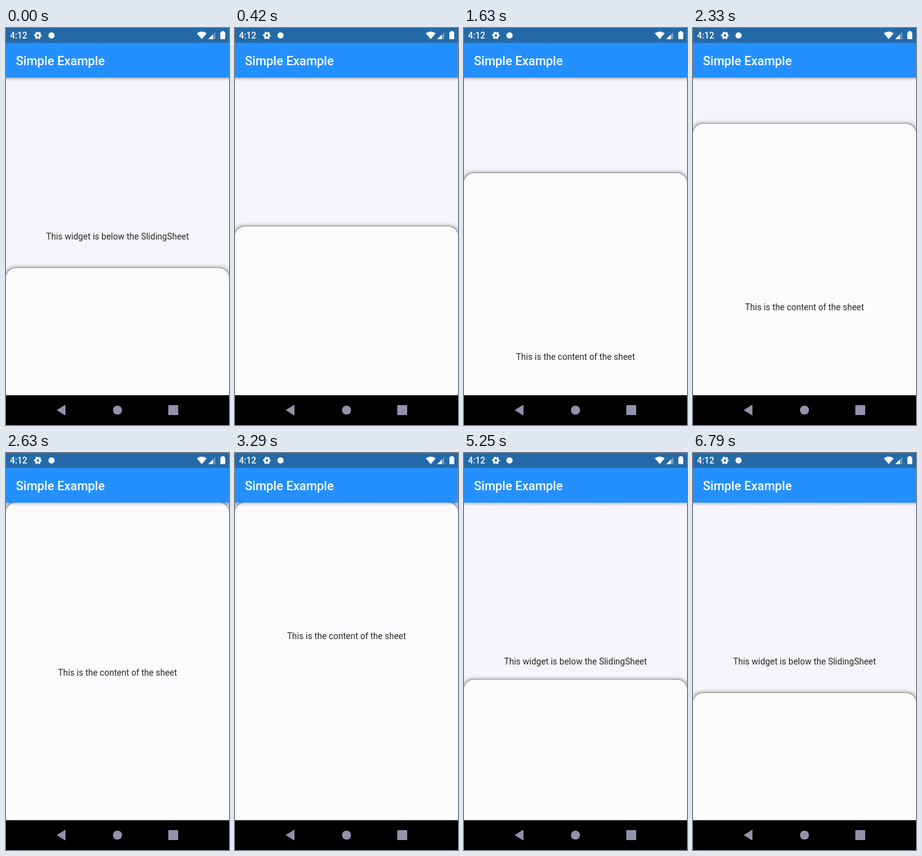
Write an HTML page that moves like this. It is 360 px wide and 640 px high and loops after 7000 ms.

```html
<!DOCTYPE html>
<html lang="en">
<head>
<meta charset="utf-8">
<title>Sliding sheet</title>
<style>
  html, body { margin: 0; width: 100%; height: 100%; overflow: hidden; background: #000; }
  svg { display: block; width: 100%; height: 100%; font-family: Roboto, sans-serif; font-size: 14px; }
</style>
</head>
<body>
<svg viewBox="0 0 360 640">
  <defs>
    <linearGradient id="fade" x1="0" y1="0" x2="0" y2="1">
      <stop offset="0" stop-opacity=".25"/>
      <stop offset=".4" stop-opacity=".1"/>
      <stop offset="1" stop-opacity="0"/>
    </linearGradient>
    <filter id="blur" x="-10%" y="-10%" width="120%" height="120%">
      <feGaussianBlur stdDeviation="3.5"/>
    </filter>
    <clipPath id="body"><rect y="80" width="360" height="512"/></clipPath>
  </defs>

  <g clip-path="url(#body)">
    <rect y="80" width="360" height="512" fill="#f6f5fb"/>
    <text x="180" y="341" text-anchor="middle" fill="#282826">This widget is below the SlidingSheet</text>
    <g id="sheet">
      <rect x="-2" y="-1" width="364" height="620" rx="16" opacity=".36" filter="url(#blur)"/>
      <rect x="-.5" y="-1.5" width="361" height="620" rx="16" fill="#888880" opacity=".55"/>
      <rect width="360" height="620" rx="16" fill="#fcfcfe"/>
    </g>
    <text id="content" x="180" text-anchor="middle" fill="#282826">This is the content of the sheet</text>
    <rect y="80" width="360" height="6" fill="url(#fade)"/>
  </g>

  <rect y="24" width="360" height="56" fill="#2490ff"/>
  <rect width="360" height="24" fill="#256aa8"/>
  <text x="16" y="60" fill="#fff" font-size="20" font-weight="500">Simple Example</text>

  <g fill="#fff">
    <text x="6.500" y="17" font-weight="500">4:12</text>
    <g transform="translate(51.5 12)" fill="none" stroke="#fff">
      <circle r="3.5" stroke-width="3"/>
      <circle r="5.2" stroke-width="2" stroke-dasharray="2.8 2.645" stroke-dashoffset="1.4"/>
    </g>
    <circle cx="73.500" cy="12" r="5"/>
    <path d="M308 8.500Q316 3 324 8.500L316 18Z"/>
    <path d="M326.500 18L338 6.500V18Z" opacity=".3"/>
    <path d="M326.500 18L334 10.500V18Z"/>
    <path d="M348 6.500V5H352V6.500H353Q354 6.500 354 7.500V17Q354 18 353 18H347Q346 18 346 17V7.500Q346 6.500 347 6.500Z"/>
  </g>

  <rect y="592" width="360" height="48"/>
  <g fill="#9292ac">
    <path d="M82.500 616L95.500 608V624Z" stroke="#9292ac" stroke-linejoin="round"/>
    <circle cx="180" cy="616" r="7.300"/>
    <rect x="262" y="608" width="16" height="16" rx="1"/>
  </g>
</svg>
<script>
  const LOOP = 7000, STEP = 1000 / 24;
  const TOP = 80, REST = 387, HALF = 234, SCROLLED = -1;
  const EASE = [.25, .1, .25, 1];

  // Each move: start, end, from, to, cubic-bezier curve
  const moves = [
    [0, 1580, REST, HALF, EASE],
    [2135, 3085, HALF, SCROLLED, [.15, .2, .5, 1]],
    [3630, 4340, SCROLLED, HALF, [.3, .1, .575, 1]],
    [5042, 5410, HALF, REST, EASE]
  ];

  const cubic = (s, a, b) => 3 * (1 - s) * (1 - s) * s * a + 3 * (1 - s) * s * s * b + s * s * s;

  function bezier(x, [x1, y1, x2, y2]) {
    let lo = 0, hi = 1;
    for (let i = 0; i < 24; i++) {
      const mid = (lo + hi) / 2;
      if (cubic(mid, x1, x2) < x) lo = mid; else hi = mid;
    }
    return cubic((lo + hi) / 2, y1, y2);
  }

  function position(t) {
    let y = REST;
    for (const [start, end, from, to, curve] of moves) {
      if (t < start) break;
      y = t >= end ? to : from + (to - from) * bezier((t - start) / (end - start), curve);
    }
    return y;
  }

  const sheet = document.getElementById('sheet');
  const content = document.getElementById('content');

  // Past the top edge the sheet stops and its content scrolls on
  function draw(time) {
    const t = Math.floor((time % LOOP + 5) / STEP) * STEP % LOOP;
    const y = position(t);
    sheet.setAttribute('transform', `translate(0 ${Math.max(TOP, y).toFixed(2)})`);
    content.setAttribute('y', (y + 301).toFixed(2));
  }

  const begin = performance.now();
  function tick() {
    draw(performance.now() - begin);
    requestAnimationFrame(tick);
  }
  tick();
</script>
</body>
</html>
```
